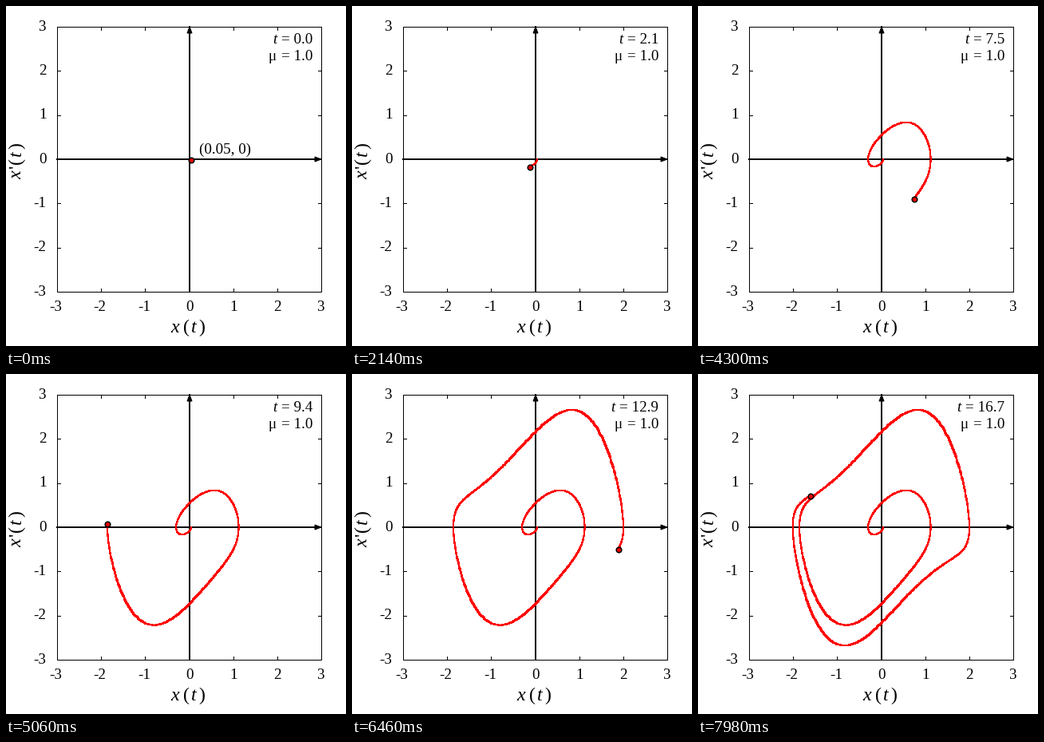
A matplotlib script for the animation above (8000 ms loop, 426 px wide and 426 px high).

```python
import numpy as np
import matplotlib.pyplot as plt
from matplotlib.animation import FuncAnimation

SIZE = 426
DPI = 100
PT = 72 / DPI              # points per pixel
MU = 1.0
START = (0.05, 0.0)
STEP_MS, LOOP_MS = 20, 8000
LABEL_MS, REST_MS, MOVE_MS = 500, 1300, 40
SUB = 10                   # integration steps per 0.1 time unit

LEFT, RIGHT, TOP, BOTTOM = 64, 395, 26, 358
FONT, BIG = 19, 24
DIGIT = FONT / 2

fig = plt.figure(figsize=(SIZE / DPI, SIZE / DPI), dpi=DPI, facecolor="white")
ax = fig.add_axes([0, 0, 1, 1])
ax.set_xlim(0, SIZE)
ax.set_ylim(SIZE, 0)
ax.axis("off")


def to_px(x, y):
    px = LEFT + (np.asarray(x) + 3) / 6 * (RIGHT - LEFT)
    py = BOTTOM - (np.asarray(y) + 3) / 6 * (BOTTOM - TOP)
    return px, py


def line(xs, ys, width=1, color="black", **kw):
    return ax.plot(xs, ys, color=color, lw=width * PT, **kw)[0]


def text(x, y, s, size=FONT, italic=False, **kw):
    return ax.text(x, y, s, fontsize=size * PT, family="Liberation Serif",
                   style="italic" if italic else "normal",
                   va="baseline", rotation_mode="anchor", **kw)


def slope(s):
    x, v = s
    return np.array([v, MU * (1 - x * x) * v - x])


def solve(count, h):
    """Van der Pol orbit by fourth-order Runge-Kutta."""
    s = np.array(START)
    path = [s]
    for _ in range(count):
        a = slope(s)
        b = slope(s + h / 2 * a)
        c = slope(s + h / 2 * b)
        d = slope(s + h * c)
        s = s + h / 6 * (a + 2 * b + 2 * c + d)
        path.append(s)
    return np.array(path)


def draw_frame():
    line([LEFT, RIGHT, RIGHT, LEFT, LEFT], [TOP, TOP, BOTTOM, BOTTOM, TOP])
    for n in range(-3, 4):
        px, py = to_px(n, n)
        col, row = np.rint([px, py])
        if abs(n) < 3:
            for edge, inner in ((TOP, TOP + 4), (BOTTOM, BOTTOM - 4)):
                line([col, col], [edge, inner])
            for edge, inner in ((LEFT, LEFT + 4), (RIGHT, RIGHT - 4)):
                line([edge, inner], [row, row])
        minus = FONT / 3 if n < 0 else 0
        text(50.5 - DIGIT - minus, py + 4.6, str(n))
        shift = -1.5 if n < 0 else 0
        text(px + shift - (DIGIT + minus) / 2, 382, str(n))


def draw_axes():
    line([LEFT, RIGHT], [192, 192], 2)
    line([230, 230], [TOP, BOTTOM], 2)
    ax.fill([395, 387, 387], [192, 189, 195], color="black", lw=PT)
    ax.fill([230, 227, 233], [26, 34, 34], color="black", lw=PT)


def draw_names():
    for x, s in ((206, "x"), (222, "("), (231.5, "t"), (241, ")")):
        text(x, 409, s, BIG, s.isalpha())
    for y, s in ((217, "x"), (203, "'"), (198, "("), (188.5, "t"), (179, ")")):
        text(19, y, s, BIG, s.isalpha(), rotation=90)
    text(328, 68, "\u03bc")
    text(344.6, 68, "= 1.0")


draw_frame()
draw_axes()
draw_names()

# The trail sits on whole pixels, without smoothing.
moves = (LOOP_MS - REST_MS) // MOVE_MS
orbit = np.rint(np.column_stack(to_px(*solve(moves * SUB, 0.1 / SUB).T)))

trail = line([], [], 2, "#ff0000", zorder=4, antialiased=False, snap=False)
dot = line([], [], marker="o", ms=6.6 * PT, mfc="#e60000", mec="black",
           mew=1.5 * PT, zorder=5)
start_label = text(242, 185, "(0.05, 0)")
t_name = text(333.8, 47, "t", italic=True)
t_value = text(344.6, 47, "= 0.0")


def update(i):
    ms = i * STEP_MS
    k = max(0, (ms - REST_MS) // MOVE_MS)
    path = orbit[:k * SUB + 1]
    trail.set_data(path[:, 0], path[:, 1])
    dot.set_data(path[-1:, 0], path[-1:, 1] + 1)
    start_label.set_visible(ms < LABEL_MS)
    shift = DIGIT if k >= 100 else 0
    t_name.set_x(333.8 - shift)
    t_value.set_x(344.6 - shift)
    t_value.set_text(f"= {k / 10:.1f}")
    return trail, dot, start_label, t_name, t_value


anim = FuncAnimation(fig, update, frames=LOOP_MS // STEP_MS, interval=STEP_MS,
                     repeat=True, repeat_delay=0)
plt.show()
```
